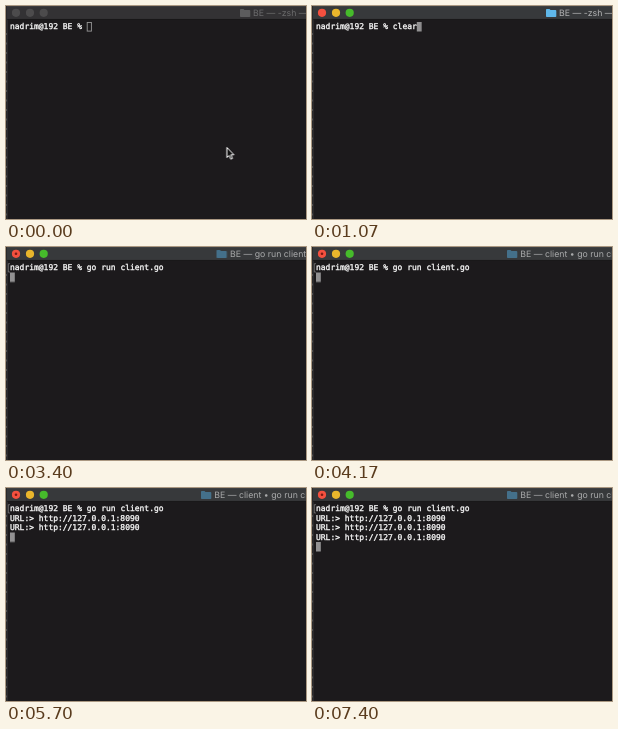
An HTML page that plays this animation: 300x213 px, repeating every 7.43 s.

```html
<!DOCTYPE html>
<html lang="en">
<head>
<meta charset="utf-8">
<title>Terminal session</title>
<style>
  html, body { margin: 0; width: 100%; height: 100%; overflow: hidden; background: #1c1a1c; }
  svg { display: block; width: 100vw; height: 100vh; }
  text { white-space: pre; text-rendering: geometricPrecision; }
  .term text { font: 7.98px "DejaVu Sans Mono", monospace; fill: #f8f8f8; stroke: #f8f8f8; stroke-width: .34px; }
  .title text { font: 8.75px Inter, "Liberation Sans", sans-serif; fill: #a9aaab; }

  /* every state change is a hard cut on one shared clock */
  .a { animation: 7430ms step-end infinite; }
  .bar { animation-name: bar; }
  .red { animation-name: red; }
  .yellow { animation-name: yellow; }
  .green { animation-name: green; }
  .title .label { animation-name: label; }
  .icon { animation-name: icon; }
  .idle { animation-name: idle; }
  .block { animation-name: block; }
  .pointer { animation-name: pointer; animation-timing-function: ease-out; }
  .clear { animation-name: clear; }
  .run { animation-name: run; }
  .entered { animation-name: entered; }
  .shell { animation-name: shell; }
  .build { animation-name: build; }
  .client { animation-name: client; }
  .url1 { animation-name: url1; }
  .url2 { animation-name: url2; }
  .url3 { animation-name: url3; }

  @keyframes bar { 0% { fill: #333234; } 1.346%, 100% { fill: #37393b; } }
  @keyframes red { 0% { fill: #4c4b4c; } 1.346%, 100% { fill: #f4503f; } }
  @keyframes yellow { 0% { fill: #4c4b4c; } 1.346%, 100% { fill: #e9b62c; } }
  @keyframes green { 0% { fill: #4c4b4c; } 1.346%, 100% { fill: #46bb2b; } }
  @keyframes label { 0% { fill: #6c6c6d; } 1.346%, 100% { fill: #b4b4b5; } }
  @keyframes icon {
    0% { color: #5c5c5d; transform: translateX(234px); }
    1.346% { color: #5fb7e9; transform: translateX(234px); }
    26.918% { color: #44708a; transform: translateX(234px); }
    33.647% { color: #44708a; transform: translateX(210.5px); }
    55.586%, 100% { color: #44708a; transform: translateX(195px); }
  }
  @keyframes idle { 0% { opacity: 1; } 1.346%, 100% { opacity: 0; } }
  @keyframes block {
    0% { opacity: 0; transform: translate(80.8px, 16px); }
    1.346% { opacity: 1; transform: translate(80.8px, 16px); }
    13.459% { opacity: 1; transform: translate(104.8px, 16px); }
    26.918% { opacity: 1; transform: translate(157.6px, 16px); }
    33.647% { opacity: 1; transform: translate(4px, 25.5px); }
    61.911% { opacity: 1; transform: translate(4px, 35px); }
    75.37% { opacity: 1; transform: translate(4px, 44.5px); }
    88.829%, 100% { opacity: 1; transform: translate(4px, 54px); }
  }
  @keyframes pointer {
    0%, .404% { opacity: 1; transform: translate(220.5px, 141px); }
    7.133% { opacity: 1; transform: translate(218px, 137.5px); animation-timing-function: step-end; }
    13.459%, 100% { opacity: 0; transform: translate(218px, 137.5px); }
  }
  @keyframes clear { 0% { opacity: 0; } 13.459% { opacity: 1; } 26.918%, 100% { opacity: 0; } }
  @keyframes run { 0% { opacity: 0; } 26.918%, 100% { opacity: 1; } }
  @keyframes entered { 0% { opacity: 0; } 33.647%, 100% { opacity: 1; } }
  @keyframes shell { 0% { opacity: 1; } 33.647%, 100% { opacity: 0; } }
  @keyframes build { 0% { opacity: 0; } 33.647% { opacity: 1; } 55.586%, 100% { opacity: 0; } }
  @keyframes client { 0% { opacity: 0; } 55.586%, 100% { opacity: 1; } }
  @keyframes url1 { 0% { opacity: 0; } 61.911%, 100% { opacity: 1; } }
  @keyframes url2 { 0% { opacity: 0; } 75.37%, 100% { opacity: 1; } }
  @keyframes url3 { 0% { opacity: 0; } 88.829%, 100% { opacity: 1; } }
</style>
</head>
<body>
<svg viewBox="0 0 300 213" preserveAspectRatio="none">
  <rect width="300" height="213" fill="#1c1a1c"/>

  <!-- sliver of the window behind -->
  <rect width="1" height="213" fill="#29292a"/>
  <path d="M.5 27V213" stroke="#777" stroke-dasharray="2 7.5" opacity=".5"/>
  <path d="M1.5 13V213" stroke="#343334" stroke-width=".7"/>

  <rect class="a bar" x="1" width="299" height="13.3"/>
  <path d="M1 .3H300" stroke="#4a4b4c" stroke-width=".5"/>
  <path d="M1 13.4H300" stroke="#111" stroke-width=".6"/>
  <circle class="a red" cx="10" cy="6.8" r="4.1"/>
  <circle class="a yellow" cx="24" cy="6.8" r="4.1"/>
  <circle class="a green" cx="37.7" cy="6.8" r="4.1"/>
  <!-- a process is running -->
  <circle class="a entered" cx="10" cy="6.8" r="1.3" fill="#7a1a12"/>

  <g class="title">
    <path class="a icon" fill="currentColor" d="M0 3.8q0-.8.8-.8h2.7l1 1.1h5q.8 0 .8.8v5.3q0 .8-.8.8H.8q-.8 0-.8-.8z"/>
    <g class="a shell"><text class="a label" x="247" y="10.3">BE — -zsh — 80×24</text></g>
    <text class="a build" x="224" y="10.3">BE — go run client.go</text>
    <text class="a client" x="208.3" y="10.3">BE — client • go run client.go</text>
  </g>

  <g class="term">
    <path class="a entered" d="M4 16.7H2.3V25H4" fill="none" stroke="#8b8b8b" stroke-width=".7"/>
    <rect class="a idle" x="81.2" y="16.5" width="4.2" height="8.6" fill="none" stroke="#979797" stroke-width=".9"/>
    <rect class="a block" width="4.8" height="9.5" fill="#929192"/>
    <text x="4" y="23.1">nadrim@192 BE % </text>
    <text class="a clear" x="80.8" y="23.1">clear</text>
    <text class="a run" x="80.8" y="23.1">go run client.go</text>
    <text class="a url1" x="4" y="32.7">URL:&gt; http://127.0.0.1:8090</text>
    <text class="a url2" x="4" y="42.2">URL:&gt; http://127.0.0.1:8090</text>
    <text class="a url3" x="4" y="51.7">URL:&gt; http://127.0.0.1:8090</text>
  </g>

  <path class="a pointer" d="M.4.4V10.6L2.7 8.5 4.3 12.2 6 11.4 4.4 7.8H7.4Z" fill="#111" stroke="#fff"/>
</svg>
</body>
</html>
```
